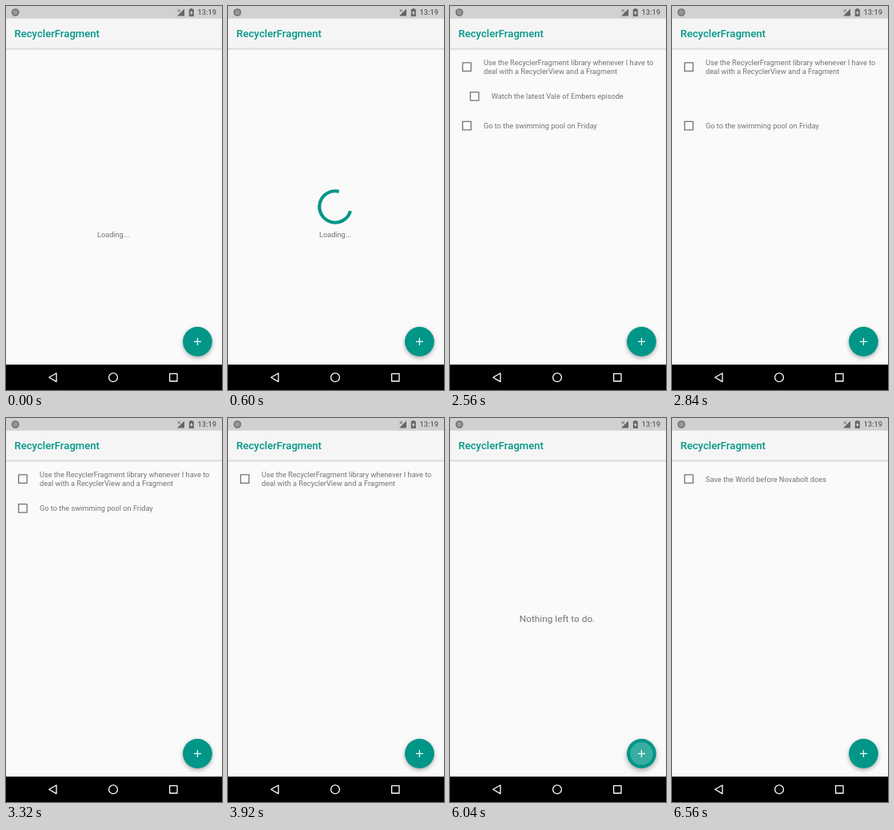
These frames come from a looping animation (270 px wide and 480 px high, 6800 ms). An HTML page with a canvas:

```html
<!DOCTYPE html>
<html lang="en">
<head>
<meta charset="utf-8">
<title>RecyclerFragment</title>
<style>
html, body { margin: 0; width: 100%; height: 100%; overflow: hidden; background: #fafafa; }
canvas { display: block; width: 270px; height: 480px; }
</style>
</head>
<body>
<canvas id="stage"></canvas>
<script>
const LOOP = 6800, STEP = 40;
const W = 270, H = 480, DP = 0.65625;
const TEAL = '#009688', GREY = '#737373', DARK = '#666';
const MID = 134 / DP;

const canvas = document.getElementById('stage');
const ctx = canvas.getContext('2d');
const ratio = window.devicePixelRatio || 1;
canvas.width = W * ratio;
canvas.height = H * ratio;

const clamp = v => Math.max(0, Math.min(1, v));
const span = (t, a, b) => clamp((t - a) / (b - a));
const smooth = p => (1 - Math.cos(Math.PI * p)) / 2;
const swipe = p => 412 * Math.pow(p, 1.6);

// Cubic easing through (x1, y1) and (x2, y2), solved by bisection.
function bezier(p, x1, y1, x2, y2) {
  const at = (u, a, b) => 3 * u * (1 - u) * (1 - u) * a + 3 * u * u * (1 - u) * b + u * u * u;
  let lo = 0, hi = 1;
  for (let i = 0; i < 20; i++) {
    const m = (lo + hi) / 2;
    if (at(m, x1, x2) < p) lo = m; else hi = m;
  }
  return at(lo, y1, y2);
}

function box(x, y, w, h, color) {
  ctx.fillStyle = color;
  ctx.fillRect(x, y, w, h);
}

function poly(points, color) {
  ctx.beginPath();
  points.forEach(([x, y]) => ctx.lineTo(x, y));
  ctx.closePath();
  ctx.fillStyle = color;
  ctx.fill();
}

function disc(x, y, r, color) {
  ctx.beginPath();
  ctx.arc(x, y, r, 0, 2 * Math.PI);
  ctx.fillStyle = color;
  ctx.fill();
}

function label(str, x, y, size, color = GREY, weight = 400, align = 'left') {
  ctx.font = `${weight} ${size}px Roboto, sans-serif`;
  ctx.textAlign = align;
  ctx.fillStyle = color;
  ctx.fillText(str, x, y);
}

// Runs draw in dp units with the given opacity.
function inDp(alpha, draw) {
  if (alpha <= 0) return;
  ctx.save();
  ctx.scale(DP, DP);
  ctx.globalAlpha = alpha;
  draw();
  ctx.restore();
}

// slot: position in the list; dx: swipe distance in dp
function row(lines, slot, dx = 0, alpha = 1) {
  if (dx >= 412) return;
  inDp(alpha, () => {
    const y = 116 + 56 * slot;
    ctx.strokeStyle = GREY;
    ctx.lineWidth = 2;
    ctx.lineJoin = 'round';
    ctx.strokeRect(24 + dx, y - 8, 16, 16);
    const first = y + 5.2 - (lines.length - 1) * 8.2;
    lines.forEach((s, i) => label(s, 64 + dx, first + 16.4 * i, 14));
  });
}

function spinner(t) {
  const p = (t % 1333) / 1333;
  const shift = 0.25 * p + (t * 2) / 6665;
  const head = 0.75 * bezier(clamp(p * 2), 0.4, 0, 0.2, 1);
  const tail = 0.75 * bezier(clamp(p * 2 - 1), 0.4, 0, 0.2, 1);
  if (head - tail < 0.002) return;
  const angle = f => 2 * Math.PI * (f + shift - 0.25);
  ctx.beginPath();
  ctx.arc(MID, 251 / DP, 30, angle(tail), angle(head));
  ctx.strokeStyle = TEAL;
  ctx.lineWidth = 6.3;
  ctx.stroke();
}

function statusBar() {
  box(0, 0, W, 15.75, '#d1d1d1');
  disc(11.7, 8, 4.8, '#707070');
  disc(11.7, 8, 3.2, '#969696');
  // signal
  poly([[223, 3.5], [223, 12.5], [214, 12.5]], DARK);
  ctx.strokeStyle = DARK;
  ctx.lineWidth = 0.9;
  ctx.beginPath();
  ctx.moveTo(214.5, 4); ctx.lineTo(218, 7.5);
  ctx.moveTo(218, 4); ctx.lineTo(214.5, 7.5);
  ctx.stroke();
  // battery
  box(228.8, 4, 6, 9, DARK);
  box(230.5, 3, 2.6, 1.2, DARK);
  poly([[232.3, 5.2], [230, 9], [231.5, 9], [231.3, 11.8], [233.6, 8], [232.1, 8]], '#e0e0e0');
  inDp(1, () => label('13:19', 365, 17.4, 14, '#606060', 500));
}

function toolbar() {
  const fade = ctx.createLinearGradient(0, 52.5, 0, 56);
  fade.addColorStop(0, 'rgba(0,0,0,0.24)');
  fade.addColorStop(0.4, 'rgba(0,0,0,0.08)');
  fade.addColorStop(1, 'rgba(0,0,0,0)');
  box(0, 52.5, W, 3.5, fade);
  box(0, 15.75, W, 36.75, '#f5f5f5');
  inDp(1, () => label('RecyclerFragment', 16, 59.3, 20, TEAL, 500));
}

function navBar() {
  box(0, 448.3, W, H - 448.3, '#000');
  ctx.strokeStyle = '#fff';
  ctx.lineWidth = 1.3;
  ctx.lineJoin = 'round';
  ctx.beginPath();
  ctx.moveTo(63, 459);
  ctx.lineTo(63, 469.6);
  ctx.lineTo(53.8, 464.3);
  ctx.closePath();
  ctx.stroke();
  ctx.beginPath();
  ctx.arc(134, 464.3, 5.4, 0, 2 * Math.PI);
  ctx.stroke();
  ctx.strokeRect(204.6, 459.6, 9.4, 9.4);
}

function fab(t) {
  const x = 239.4, y = 419.5, r = 18.4;
  const press = smooth(span(t, 5920, 6080)) * (1 - smooth(span(t, 6160, 6480)));
  ctx.save();
  ctx.shadowColor = 'rgba(0,0,0,0.32)';
  ctx.shadowBlur = (5 + 2 * press) * ratio;
  ctx.shadowOffsetY = (2 + press) * ratio;
  disc(x, y, r, TEAL);
  ctx.restore();

  const grow = span(t, 5920, 6200);
  const glow = 0.22 * Math.min(1, grow * 3) * (1 - span(t, 6200, 6560));
  if (glow > 0) disc(x, y, r * (0.35 + 0.65 * Math.sqrt(grow)), `rgba(255,255,255,${glow})`);

  const plus = 'rgba(255,255,255,0.94)';
  box(x - 4.6, y - 0.65, 9.2, 1.3, plus);
  box(x - 0.65, y - 4.6, 1.3, 9.2, plus);
}

const ITEMS = [
  ['Use the RecyclerFragment library whenever I have to', 'deal with a RecyclerView and a Fragment'],
  ['Watch the latest Vale of Embers episode'],
  ['Go to the swimming pool on Friday'],
  ['Save the World before Novabolt does']
];

function content(t) {
  const shown = smooth(span(t, 720, 1120));
  inDp(1 - shown, () => {
    spinner(t);
    label('Loading...', MID, 441, 14, GREY, 400, 'center');
  });

  if (t < 4960) {
    const lift = smooth(span(t, 3040, 3320));
    row(ITEMS[0], 0, swipe(span(t, 4640, 4920)), shown);
    row(ITEMS[1], 1, swipe(span(t, 2520, 2840)), shown);
    row(ITEMS[2], 2 - lift, swipe(span(t, 3680, 3920)), shown);
  }

  const empty = span(t, 4840, 4960) * (1 - smooth(span(t, 6120, 6480)));
  inDp(empty, () => label('Nothing left to do.', MID, 388.6, 18, GREY, 400, 'center'));
  row(ITEMS[3], 0, 0, smooth(span(t, 6160, 6560)));
}

function draw(t) {
  ctx.setTransform(ratio, 0, 0, ratio, 0, 0);
  box(0, 0, W, H, '#fafafa');
  content(t);
  toolbar();
  statusBar();
  fab(t);
  navBar();
}

const start = performance.now();
function tick() {
  const t = (performance.now() - start) % LOOP;
  draw(Math.floor(t / STEP) * STEP);
  requestAnimationFrame(tick);
}
tick();
</script>
</body>
</html>
```
